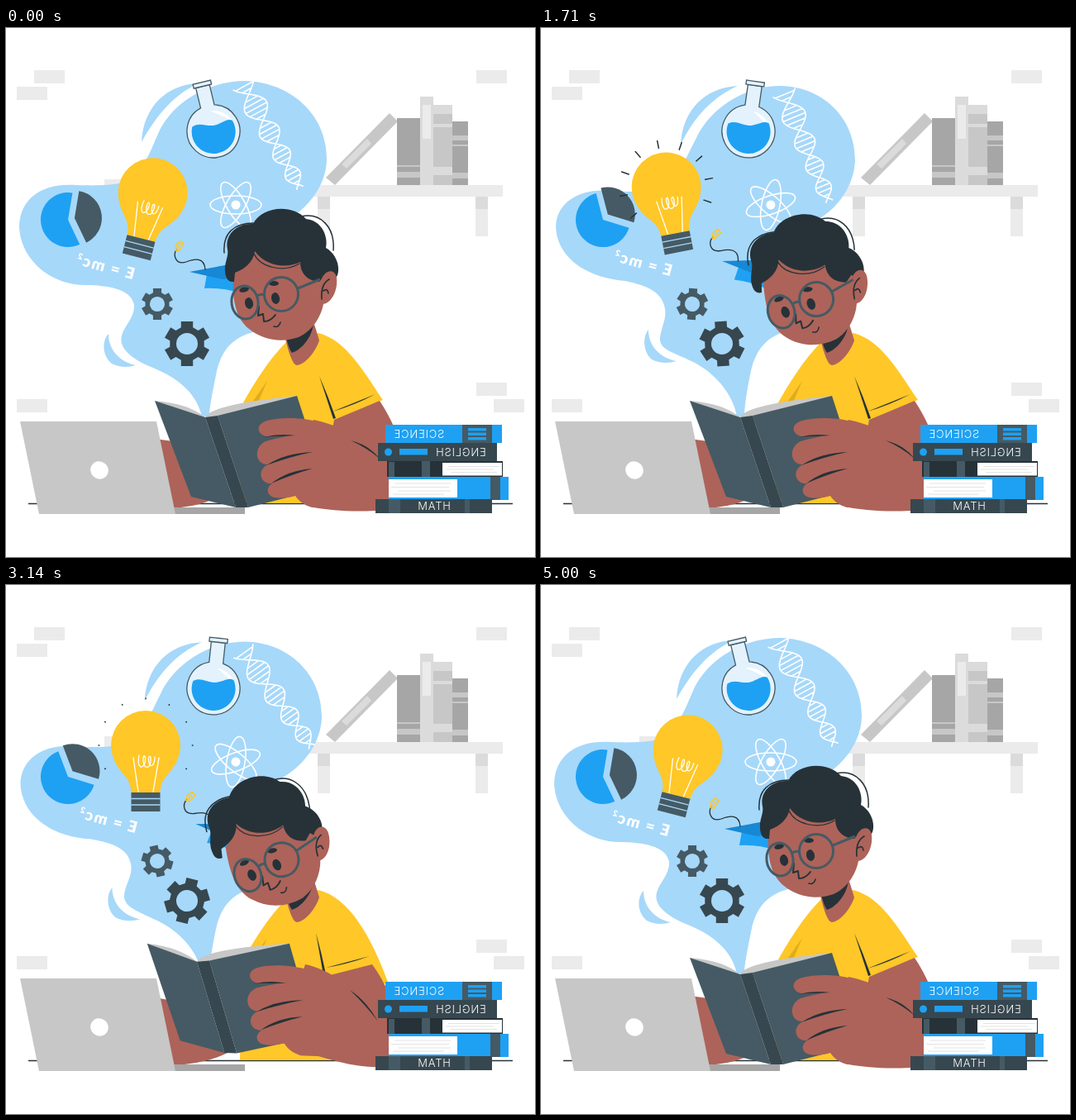
An HTML page for the animation above (5.07 s loop, 640 px wide and 640 px high).

```html
<!DOCTYPE html>
<html lang="en">
<head>
<meta charset="utf-8">
<title>Reading and ideas</title>
<style>
html, body { margin: 0; width: 100%; height: 100%; overflow: hidden; background: #fff; }
svg { display: block; width: 100%; height: 100%; }
.sky { fill: #a6d8fa; } .blue { fill: #1ea1f3; } .dark { fill: #263238; }
.slate { fill: #455a64; } .deep { fill: #37474f; } .skin { fill: #ad6359; }
.gold { fill: #ffc727; } .g1 { fill: #ebebeb; } .g2 { fill: #dbdbdb; }
.g3 { fill: #c7c7c7; } .g4 { fill: #a6a6a6; }
.line { fill: none; stroke: #263238; stroke-linecap: round; stroke-linejoin: round; }
.thin { fill: none; stroke: #fff; stroke-width: 1.6; stroke-linecap: round; }
.wire { stroke-width: 1.3; }
.title { fill: #fff; font: 300 13px Inter, "Open Sans", sans-serif; text-anchor: middle; letter-spacing: .8px; }
.formula { fill: #fff; font: 900 19px Lato, sans-serif; text-anchor: middle; letter-spacing: 1.6px; }
</style>
</head>
<body>
<svg viewBox="0 0 640 640">
  <defs>
    <path id="brick" d="M0 0H37V16H0Z" class="g1"/>
    <path id="gear" fill-rule="evenodd"/>
  </defs>

  <!-- room -->
  <use href="#brick" x="34" y="51"/><use href="#brick" x="13" y="71"/>
  <use href="#brick" x="569" y="51"/><use href="#brick" x="569" y="429"/>
  <use href="#brick" x="590" y="449"/><use href="#brick" x="13" y="449"/>
  <use href="#brick" x="119" y="183"/>
  <path class="g1" d="M366 190H601V204H366ZM377 204h15v48h-15ZM568 204h15v48h-15Z"/>
  <path class="g2" d="M377 204h15v15h-15ZM568 204h15v15h-15Z"/>
  <path class="g3" d="M387 181L464 103L474 113L398 190Z"/>
  <path class="g2" d="M406 165L437 134L442 140L412 170Z"/>
  <path class="g4" d="M473 109h28v81h-28ZM540 113h19v77h-19Z"/>
  <path class="g3" d="M473 166h28v2h-28ZM473 174h28v7h-28ZM517 93h23v97h-23ZM540 130h19v6h-19ZM540 141h19v2h-19ZM540 175h19v7h-19Z"/>
  <path class="g2" d="M501 83h16v107h-16ZM517 93h23v11h-23ZM517 116h23v4h-23ZM517 168h23v10h-23Z"/>
  <path class="g1" d="M504 93h10v41h-10Z"/>

  <!-- ideas -->
  <path id="cloud" class="sky"/><path id="rim" class="sky"/><path id="drop" class="sky"/>
  <path id="pie" class="blue"/><path id="slice" class="slate"/>
  <g id="formula"><text class="formula" y="6">E = mc<tspan font-size="10" dy="-7">2</tspan></text></g>
  <g id="bulb">
    <path id="rays" class="line" stroke-width="1.5"/>
    <circle r="42" class="gold"/>
    <path class="gold" d="M-38 18C-31 35-18 38-17.500 57H17.500C18 38 31 35 38 18Z"/>
    <path class="slate" d="M-17.500 57h35v23h-35Z"/>
    <path d="M-17.500 64.500h35M-17.500 72h35" stroke="#a6d8fa" stroke-width="1.300"/>
    <path class="thin wire" d="M-9 56L-15 15M9 56L16 15M-8 12C-11 27-4 30-1 21C1 11-4 10-3 19C-2 29 5 29 6 19C7 10 2 12 4 21C6 28 11 24 11 14"/>
  </g>
  <g id="flask" stroke="#455a64" stroke-width="1.300">
    <path fill="#e3f2fd" d="M-8.500-56V-31A32 32 0 1 0 8.500-31V-56Z"/>
    <path fill="#e3f2fd" d="M-11-61H11V-56H-11Z"/>
    <path fill="#fff" stroke="none" d="M2-25C15-23 24-15 27-3C20-13 12-17 2-25Z"/>
    <path id="liquid" class="blue" stroke="none" d="M-25-8C-14-14-6-4 6-8C14-10 18-14 24-11A26.500 26.500 0 1 1-25-8Z"/>
  </g>
  <path id="dna" class="thin"/>
  <g id="atom" class="thin">
    <ellipse rx="31" ry="11"/><ellipse rx="31" ry="11" transform="rotate(60)"/><ellipse rx="31" ry="11" transform="rotate(120)"/>
    <circle r="5.500" fill="#fff" stroke="none"/>
  </g>
  <use id="gearS" href="#gear" class="slate"/><use id="gearL" href="#gear" class="deep"/>
  <g id="cap">
    <path class="blue" d="M243 298L240 315Q258 314 278 319L280 300Z"/>
    <path fill="#1788d3" d="M222 295L270 286L290 300L262 304Z"/>
    <path class="line" stroke-width="1.300" d="M241 292C240 277 228 279 218 283C205 287 202 275 206 268"/>
    <path d="M205 269L206 262L211 258L215 261L209 270Z" fill="none" stroke="#ffc727" stroke-width="1.600"/>
    <path d="M207 268L211 261" stroke="#ffc727" stroke-width="1.500"/>
  </g>

  <path d="M27 575.500H613" stroke="#263238" stroke-width="1.300"/>

  <!-- reader -->
  <path class="gold" d="M340 379C316 403 299 432 286 455L283 575H410L400 470L385 372Z"/>
  <path fill="#e0ac1c" d="M316 427L305 453L297 454Z"/>
  <path id="sleeve" class="gold"/>
  <path id="upper" class="skin"/>
  <path id="folds" class="dark"/>
  <path class="skin" d="M338 376C342 393 347 408 352 408C364 406 375 390 379 378L372 355L345 355Z"/>
  <path class="dark" d="M339 374L372 358C370 374 358 389 346 393Q342 388 339 374Z"/>
  <g id="head">
    <path id="curl" class="line" style="fill:#fff" stroke-width="1.500" d="M357 228C381 223 398 241 396 269"/>
    <path class="skin" d="M275 296C273 332 279 352 294 364C311 378 334 381 354 374C370 367 381 350 384 334L390 290L300 262Z"/>
    <g id="hair">
      <path class="line" stroke-width="1.500" d="M264 272C262 248 276 236 300 236"/>
      <path class="dark" d="M266 300C262 286 270 278 268 268C264 249 280 236 299 237C309 216 346 212 363 231C381 233 390 250 387 266C398 272 405 287 401 299Q396 309 386 299L379 307C366 306 356 298 356 283C340 291 315 289 301 270C299 284 288 292 277 296L276 307Q268 308 266 300Z"/>
      <path class="line" stroke-width="1.200" d="M300 273C307 289 335 297 355 285"/>
    </g>
    <path class="skin" d="M381 306C384 294 397 289 400 302C402 319 392 335 382 334Z"/>
    <path class="line" stroke-width="1.700" d="M382 328C381 316 384 308 391 304M384 318Q389 314 390 321"/>
    <g id="face">
      <ellipse class="dark" cx="288" cy="316.500" rx="6" ry="3" transform="rotate(-15 288 316)"/>
      <ellipse class="dark" cx="324" cy="309" rx="6" ry="3"/>
      <ellipse id="eyeL" class="dark" cx="294" cy="333" rx="5" transform="rotate(-12 294 333)"/>
      <ellipse id="eyeR" class="dark" cx="326" cy="327" rx="5" transform="rotate(-12 326 327)"/>
      <path class="line" stroke-width="2" d="M306 337L305 348L311 346L312 355Q320 355 326 347"/>
      <path class="line" stroke-width="1.600" d="M324 361Q330 363 332 356"/>
      <g fill="none" stroke="#455a64" stroke-width="3">
        <ellipse cx="289" cy="332" rx="16" ry="20" transform="rotate(-8 289 332)"/>
        <circle cx="333" cy="322" r="20.500"/>
        <path d="M303 325Q308 321 313 323M353 315L380 304"/>
      </g>
    </g>
  </g>
  <path id="armL" class="skin"/>
  <path id="forearm" class="skin"/>
  <path id="crease" class="dark"/>
  <g id="book">
    <path class="g3" d="M180 451Q220 454 241 471Q249 455 352 445L256 478Z"/>
    <path id="page" fill="#e0e0e0"/>
    <path class="slate" d="M180 451L241 471L278 580L224 567ZM256 469L352 445L388 556L293 580Z"/>
    <path class="deep" d="M241 471L256 469L293 580L278 580Z"/>
    <path class="skin" d="M316 475C334 470 362 471 384 478L395 580H370C360 577 354 572 350 566Q335 570 325 568C315 566 314 556 322 551C307 552 303 535 317 528C302 529 298 508 314 500Q328 496 346 493L320 495C302 494 301 479 316 475Z"/>
    <path class="dark" d="M315 529Q338 514 371 513Q346 518 315 529ZM321 551Q341 535 371 533Q346 540 321 551ZM312 495Q330 490 350 493Q330 494 312 495Z"/>
  </g>

  <!-- laptop -->
  <path class="g4" d="M119 580H289V588H119Z"/>
  <path class="g3" d="M17 476H182L205 588H40Z"/>
  <ellipse cx="113" cy="535" rx="11" ry="10.500" fill="#fff" transform="rotate(40 113 535)"/>

  <!-- textbooks -->
  <path class="blue" d="M459 480H600V502H459Z"/>
  <path class="slate" d="M552 480h36v22h-36Z"/>
  <path class="blue" d="M559 484h22v3.500h-22ZM559 489.500h22v3.500h-22ZM559 495h22v3.500h-22Z"/>
  <path class="deep" d="M450 502H594V524H450Z"/>
  <circle cx="462.500" cy="513" r="4.500" class="blue"/><path class="blue" d="M476 509h34v7.500h-34Z"/>
  <path class="dark" d="M461 524H601V543H461Z"/>
  <path class="slate" d="M463 525h7v18h-7ZM503 524h10v19h-10Z"/>
  <path fill="#fff" d="M528 526h72v15.500h-72Z"/>
  <path class="blue" d="M463 543H608V571H463Z"/>
  <path class="slate" d="M586 543h12v28h-12Z"/>
  <path fill="#fff" d="M463 546h83v22h-83Z"/>
  <path d="M535 530.500h62M532 534h58M538 537.500h56M470 551h68M466 555.500h70M475 560h63M468 564h62" stroke="#dbdbdb" stroke-width=".8"/>
  <path class="deep" d="M447 570H588V587H447Z"/>
  <path class="slate" d="M463 570h14v17h-14ZM555 570h6v17h-6Z"/>
  <text class="title" transform="translate(499.500 496) scale(-1 1)">SCIENCE</text>
  <text class="title" transform="translate(550 518) scale(-1 1)">ENGLISH</text>
  <text class="title" x="518.500" y="583">MATH</text>
</svg>
<script>
const LOOP = 5070, CYCLE = 5000, STEP = CYCLE / 70;
const TIMES = [0, 640, 1710, 2430, 3140, 4210];
const { sin, cos, PI, floor, min, max, abs } = Math;
const el = {};
document.querySelectorAll('[id]').forEach(e => el[e.id] = e);

const set = (id, d) => el[id].setAttribute('d', d);
const move = (id, v) => el[id].setAttribute('transform', v);
const smooth = k => k * k * (3 - 2 * k);

// Periodic cubic curve through one value per entry in TIMES
function drift(vals, t) {
  const n = TIMES.length;
  const at = j => {
    const w = (j + n) % n;
    return [TIMES[w] + CYCLE * floor(j / n), vals[w]];
  };
  let i = n - 1;
  while (TIMES[i] > t) i--;
  const [a, b, c, d] = [at(i - 1), at(i), at(i + 1), at(i + 2)];
  const h = c[0] - b[0], u = (t - b[0]) / h;
  const m0 = (c[1] - a[1]) / (c[0] - a[0]) * h, m1 = (d[1] - b[1]) / (d[0] - b[0]) * h;
  const s = smooth(u);
  return b[1] * (1 - s) + c[1] * s + m0 * u * (1 - u) ** 2 - m1 * u * u * (1 - u);
}

// Eased travel between [time, value] keys
function ease(keys, t) {
  let i = keys.length - 2;
  while (i && keys[i][0] > t) i--;
  const [a, b] = [keys[i], keys[i + 1]];
  const u = min(1, max(0, (t - a[0]) / (b[0] - a[0])));
  return a[1] + (b[1] - a[1]) * smooth(u);
}

// Blend two paths of the same structure
function blend([a, b], k) {
  const to = b.match(/[\d.]+/g);
  let i = 0;
  return a.replace(/[\d.]+/g, n => (+n + (to[i++] - n) * k).toFixed(2));
}

const CLOUD = [
  'M237 470C230 440 206 423 180 412C152 401 136 388 140 372C143 360 156 350 155 335C152 318 130 312 100 311C55 313 17 280 16 240C17 205 45 187 85 190C110 191 124 190 137 188C165 180 174 150 184 128C199 93 241 64 290 64C345 66 388 105 388 158C388 190 365 220 335 235L335 330L303 367C270 374 258 395 253 425C249 445 246 460 246 470Z',
  'M237 470C232 442 210 417 184 404C160 392 143 389 144 375C146 360 152 352 150 340C147 320 130 312 102 306C55 302 19 278 18 240C19 210 48 193 85 197C110 199 122 198 135 196C165 188 175 157 188 133C204 98 246 70 288 70C340 70 380 108 380 160C379 190 360 217 335 232L335 330L300 366C268 374 257 395 252 425C248 445 246 460 246 470Z'];
const RIM = [
  'M164 138C166 95 195 68 233 67C204 80 183 104 164 138Z',
  'M169 141C171 100 198 72 238 70C207 84 185 108 169 141Z'];
const DROP = [
  'M124 370C116 378 116 396 128 406Q142 413 157 408C138 404 124 390 124 370Z',
  'M130 365C123 373 123 391 134 401Q148 408 164 403C144 399 130 385 130 365Z'];
const SLEEVE = [
  'M378 369C412 378 432 415 456 450Q425 462 399 474L360 470L340 379Z',
  'M378 369C415 378 442 425 463 483Q428 480 392 473L360 470L340 379Z'];
const UPPER = [
  'M397 474L452 451Q462 466 470 484L466 530L392 502Z',
  'M392 472L443 459Q455 475 466 500L466 540L392 510Z'];
const FOLDS = [
  'M379 421L396 473L399 472Q390 446 379 421ZM395 464L447 443Q420 457 395 464Z',
  'M375 421L384 472L387 471Q382 446 375 421ZM387 463L440 449Q412 459 387 463Z'];
const CREASE = [
  'M417 499Q440 505 452 521Q437 508 417 499Z',
  'M416 490Q436 503 450 528Q435 508 416 490Z'];
const ARM_L = [
  'M180 497L202 500L226 566L246 572Q226 580 198 581Z',
  'M180 499L202 503L214 548L268 566Q240 580 198 581Z'];

const LIFT = [[0, 0], [600, 1], [700, 1], [1200, 0], [1750, 0], [2330, 1], [3400, 1], [4050, 0], [5000, 0]];
const NOD = [[0, 0], [120, 0], [640, .45], [1200, .63], [1710, .63], [2430, 1], [3140, 1.07], [3500, 1], [4100, 0], [5000, 0]];
const GLOW = [[0, 0], [560, 0], [1050, 9], [1800, 9], [2350, 0], [2500, 0]];

function gearPath() {
  let d = '';
  for (let i = 0; i < 6; i++) {
    [[-20, 21], [-15, 28], [15, 28], [20, 21]].forEach(([off, r]) => {
      const a = (i * 60 + off - 90) * PI / 180;
      d += `${d ? 'L' : 'M'}${(r * cos(a)).toFixed(2)} ${(r * sin(a)).toFixed(2)}`;
    });
  }
  return d + 'ZM13 0A13 13 0 1 0-13 0A13 13 0 1 0 13 0Z';
}

function wedge(x, y, from, to) {
  const p = a => `${x + 33 * cos(a)} ${y + 33 * sin(a)}`;
  return `M${x} ${y}L${p(from)}A33 33 0 ${to - from > PI ? 1 : 0} 1 ${p(to)}Z`;
}

function dnaPath() {
  const half = s => (16.5 - 8 * s / 148) * sin(PI * (s - 17) / (39 - .055 * s));
  let a = '', b = '', rungs = '';
  for (let s = 4; s <= 146; s += 2) {
    const w = half(s), c = a ? 'L' : 'M';
    a += `${c}${s - 74} ${w}`;
    b += `${c}${s - 74} ${-w}`;
    if (s % 6 === 0 && abs(w) > 4) rungs += `M${s - 74} ${w}V${-w}`;
  }
  return a + b + rungs;
}

function rayPath(len) {
  let d = '';
  for (let i = -4; i <= 4 && len > .1; i++) {
    const a = i * PI / 6, x = sin(a), y = -cos(a);
    d += `M${57 * x} ${57 * y}L${(57 - len) * x} ${(57 - len) * y}`;
  }
  return d;
}

function pagePath(t) {
  const p = (t - 380) / 520;
  if (p <= 0 || p >= 1) return '';
  const c = cos(PI * p), s = sin(PI * p);
  return `M241 471L${241 + 60 * c - 15 * s} ${462 - 10 * s}L${250 + 90 * c - 21 * s} ${455 - 11 * s}` +
    `L${262 + 90 * c + 9 * s} ${451 - 12 * s}L${270 + 80 * c + 9 * s} ${461 - 4 * s}L256 469Z`;
}

function ideas(t) {
  const swing = cos(2 * PI * t / CYCLE);
  const pulse = (1 - cos(2 * PI * t / 2500)) / 2, k = pulse / .7;
  set('cloud', blend(CLOUD, k));
  set('rim', blend(RIM, k));
  set('drop', blend(DROP, k));

  const mid = (-31 + 23 * swing) * PI / 180;
  const half = (72.5 - 16.5 * pulse) * PI / 180;
  set('pie', wedge(75, 232, mid + half, mid - half + 2 * PI));
  set('slice', wedge(75 + 8 * cos(mid), 231 + 8 * sin(mid), mid - half, mid + half));

  move('formula', `translate(${120 + drift([0, 1, 3, 0, 3, 1], t)} ${289 + drift([0, -2, -4, -6, -4, 1], t)}) rotate(15) scale(-1 1)`);

  const bx = drift([163.5, 163.5, 162.5, 166.5, 169, 165.5], t);
  const by = drift([254.5, 252, 248.5, 249.5, 251, 254], t);
  move('bulb', `translate(${bx} ${by}) rotate(${drift([14.4, 6.5, -11, -8, 0, 12.8], t)}) translate(0 -57)`);
  set('rays', rayPath(ease(GLOW, t % 2500)));

  const tilt = drift([-13.5, -10, 8, 9.5, 6, -10.5], t);
  move('flask', `translate(251 125) rotate(${tilt})`);
  move('liquid', `rotate(${-tilt * .6})`);

  const dx = drift([321, 320, 321, 326, 328, 324], t), dy = drift([130, 136, 143, 140, 137, 131], t);
  move('dna', `translate(${dx} ${dy}) rotate(${drift([61.4, 66.2, 67.4, 60.9, 54.4, 57.6], t)})`);
  move('atom', `translate(278 214) rotate(${12 * swing - 12})`);

  const spin = 360 * t / CYCLE;
  move('gearS', `translate(183 334) rotate(${spin}) scale(.7)`);
  move('gearL', `translate(219 382) rotate(${-spin})`);
  move('cap', `translate(${drift([0, -2, -3, 3, 7, 4], t)} ${drift([0, -4, -13, -11, -6, -3], t)}) rotate(${drift([0, 2, 9, 12, 11, 0], t)} 222 296)`);
}

function reader(t) {
  const k = ease(LIFT, t), x = -10 * k, y = -(t < 1500 ? 5 : 15) * k;
  move('book', `translate(${x} ${y}) rotate(${2 * k} 245 471)`);
  set('page', pagePath(t));
  set('sleeve', blend(SLEEVE, k));
  set('upper', blend(UPPER, k));
  set('folds', blend(FOLDS, k));
  set('crease', blend(CREASE, k));
  set('armL', blend(ARM_L, k));
  set('forearm', `M${372 + x} ${474 + y}C${410 + x} ${482 + y} 425 495 466 530V582C430 587 395 ${584 + y * .6} ${372 + x} ${580 + y}L${345 + x} ${560 + y}Z`);

  const nod = ease(NOD, t);
  move('head', `translate(${4 * nod} ${4 * nod}) rotate(${-11 * nod} 355 370)`);
  move('hair', `translate(${-7 * nod} 0)`);
  move('curl', `translate(${-11 * nod} 0)`);
  move('face', `translate(${5 * nod} ${1.5 * nod})`);
  const open = abs(t - 640) < 80 ? 2.3 : 7;
  el.eyeL.setAttribute('ry', open);
  el.eyeR.setAttribute('ry', open);
}

function draw(now) {
  const t = floor((now % LOOP + 5) / STEP) % 70 * STEP;
  ideas(t);
  reader(t);
  requestAnimationFrame(() => draw(performance.now() - start));
}

set('gear', gearPath());
set('dna', dnaPath());
const start = performance.now();
draw(0);
</script>
</body>
</html>
```
